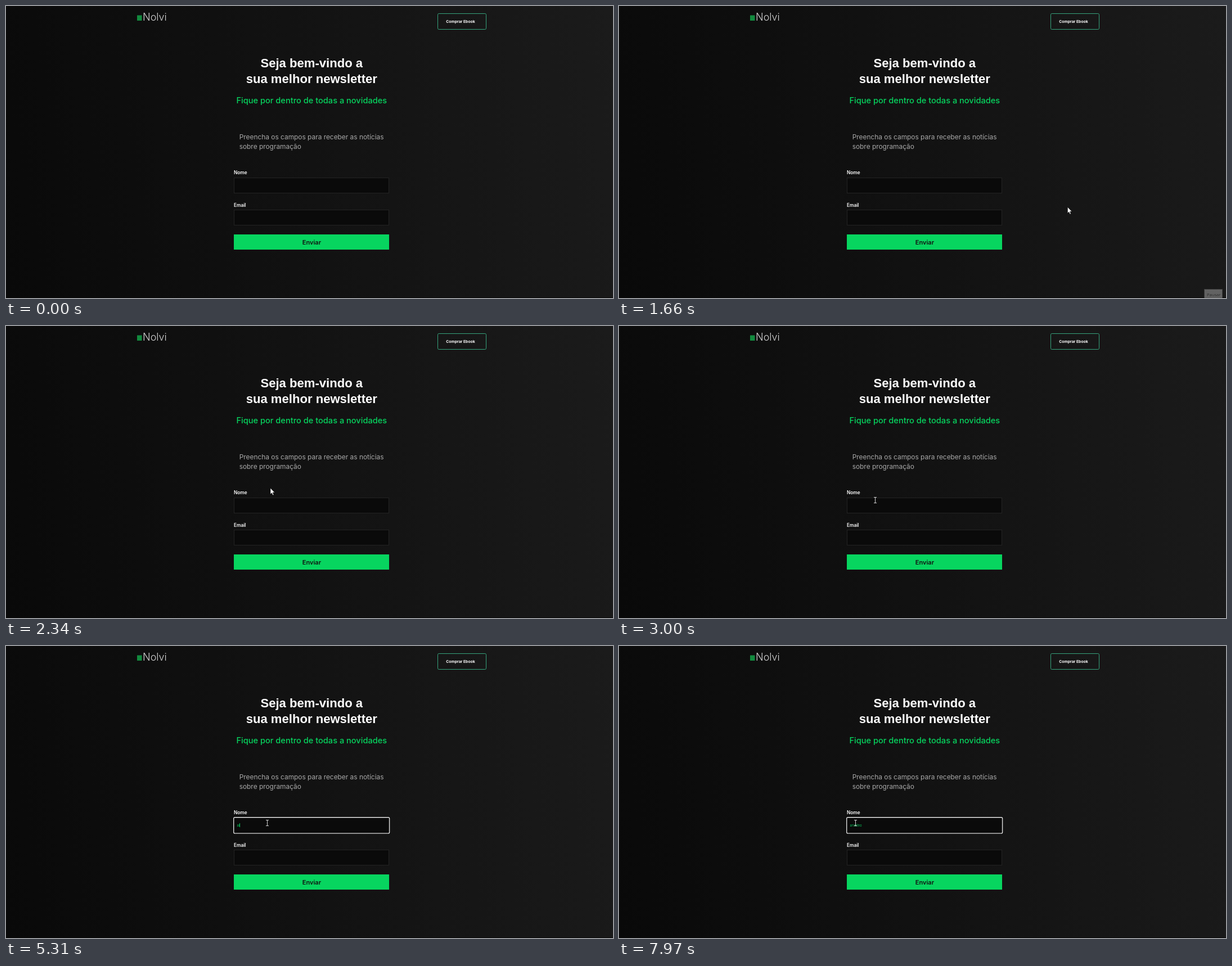
Write an HTML page that moves like this. It is 1079x519 px and loops after 8000 ms.

```html
<!DOCTYPE html>
<html lang="pt">
<head>
<meta charset="utf-8">
<title>Newsletter</title>
<style>
html, body { margin: 0; width: 100%; height: 100%; overflow: hidden; background: #111; }
svg { display: block; width: 1079px; height: 519px; background: linear-gradient(80deg, #090909, #121212 50%, #1b1b1b); }
text { font-family: Inter, sans-serif; fill: #fff; }
.mid { text-anchor: middle; }
.title { font: 700 22.1px "Liberation Sans", Arial, sans-serif; }
.sub { font-size: 14.6px; font-weight: 500; fill: #07d55f; }
.hint { font-size: 11.9px; fill: #a8a8a8; }
.label { font-size: 8.25px; font-weight: 600; }
.field { fill: #0a0a0a; stroke: #232323; }
.tip rect { fill: #fff; stroke: #8a8a8a; }
.tip text { font: 7.6px "Open Sans", sans-serif; fill: #555; }
</style>
</head>
<body>
<svg viewBox="0 0 1079 519">
  <rect y="518" width="1079" height="1" fill="#060606"/>

  <rect x="233" y="16.5" width="8.5" height="9.5" fill="#128a3e"/>
  <text x="243" y="26" font-size="18" font-weight="300" style="fill:#d2d2d2">Nolvi</text>
  <rect x="767.5" y="13.5" width="86" height="28" rx="2" fill="none" stroke="#36a37c"/>
  <text class="mid" x="808" y="30.3" font-size="6.8" font-weight="700">Comprar Ebook</text>

  <text class="mid title" x="543.3" y="109">Seja bem-vindo a</text>
  <text class="mid title" x="543.3" y="137">sua melhor newsletter</text>
  <text class="mid sub" x="543.3" y="172.6">Fique por dentro de todas a novidades</text>
  <text class="hint" x="414.7" y="236.8">Preencha os campos para receber as notícias</text>
  <text class="hint" x="414.7" y="253.5">sobre programação</text>

  <text class="label" x="405" y="299">Nome</text>
  <rect class="field" x="405.5" y="305.5" width="275" height="27"/>
  <rect id="focus" x="404.7" y="304.6" width="277" height="28.4" rx="2" fill="none" stroke="#fff" stroke-width="1.1"/>
  <text id="typed" x="410.6" y="321" font-size="5.6" style="fill:#07c65a"></text>
  <rect id="caret" y="315" width="1" height="7" fill="#07c65a"/>

  <text class="label" x="405" y="357">Email</text>
  <rect class="field" x="405.5" y="362.5" width="275" height="27"/>
  <rect x="405" y="406" width="276" height="27" fill="#07d55f"/>
  <text class="mid" x="543.4" y="423.7" font-size="11" font-weight="600" style="fill:#111">Enviar</text>

  <g id="stop" class="tip">
    <rect x="1055.5" y="509.5" width="40" height="20"/>
    <text x="1059" y="520.5">Parar</text>
  </g>
  <g id="pause" class="tip">
    <rect x="1040.5" y="503.5" width="32" height="20"/>
    <text x="1045" y="516">Pausar</text>
  </g>

  <path id="arrow" d="M0 0V11L2.5 8.7 4.2 12.8 6 12 4.3 8H7.7Z" fill="#fff" stroke="#000" stroke-width=".6"/>
  <path id="beam" d="M-2.5-5H2.5M0-5V5M-2.5 5H2.5" fill="none" stroke="#d0d0d0"/>
</svg>
<script>
const $ = id => document.getElementById(id);
const LOOP = 8000, STEP = 65.8, START = 1130;

// [time, x, y]
const arrowPath = [[1460, 1090, 540], [1660, 792, 354], [1920, 394, 100], [2314, 470, 288], [2660, 456, 304]];
const beamPath = [[2660, 455.5, 309.5], [2830, 465.5, 315.5], [3000, 455.5, 309.5], [3190, 464.5, 314.5], [7970, 420.5, 314.5]];
// [time, text, caret visible]
const typing = [
  [3190, '', 1], [3480, '', 0], [3740, 'a', 1], [4090, 'ah', 1], [4620, 'ah', 0],
  [5020, 'ah', 1], [5150, 'a', 1], [5310, 'ar', 1], [5820, 'ar', 0], [6090, 'arv', 1],
  [6220, 'arve', 1], [6420, 'arvel', 1], [6700, 'arveli', 1], [6900, 'arvelin', 1],
  [7030, 'arvelino', 1], [7560, 'arvelino', 0]
];

const last = (keys, t) => keys.filter(k => k[0] <= t).pop();
const show = (el, on) => el.style.opacity = Number(on);
const move = (el, x, y) => el.setAttribute('transform', `translate(${x} ${y})`);

function along(keys, t) {
  let i = 0;
  while (i < keys.length - 2 && t > keys[i + 1][0]) i++;
  const [t0, x0, y0] = keys[i], [t1, x1, y1] = keys[i + 1];
  const p = Math.min(1, Math.max(0, (t - t0) / (t1 - t0)));
  return [x0 + (x1 - x0) * p, y0 + (y1 - y0) * p];
}

function draw(t) {
  const s = START + Math.floor((t - START) / STEP) * STEP;

  show($('stop'), t >= START && t < 1460 ? Math.min(1, (s - START + STEP) / 200) : 0);
  show($('pause'), t >= 1460 && t < 1720 ? Math.min(1, Math.max(0.25, (1720 - s) / 200)) : 0);

  show($('arrow'), t >= 1460 && t < 2660);
  move($('arrow'), ...along(arrowPath, s));

  const beam = last(beamPath, t);
  show($('beam'), beam);
  show($('beam'), beam ? 1 : 0);
  if (beam) move($('beam'), beam[1], beam[2]);

  const [, text, caretOn] = last(typing, t) || [0, '', 0];
  show($('focus'), t >= 3190);
  $('typed').textContent = text;
  const width = text ? $('typed').getComputedTextLength() : 0;
  $('caret').setAttribute('x', Math.floor(411 + width - 0.4 * !!text));
  show($('caret'), caretOn);
}

const begin = performance.now();
function tick() {
  draw((performance.now() - begin) % LOOP);
  requestAnimationFrame(tick);
}
tick();
</script>
</body>
</html>
```
